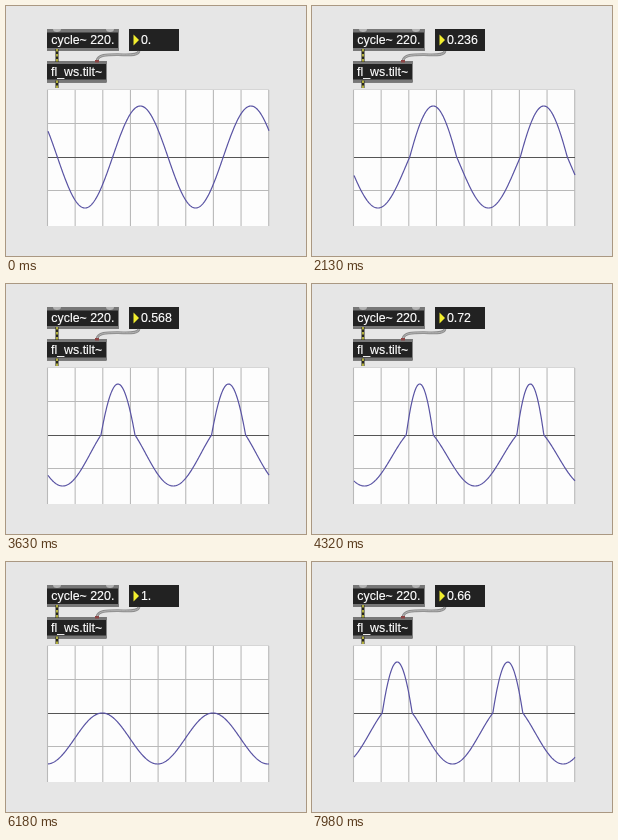
Write an HTML page that moves like this. It is 300 by 250 pixels and loops after 8000 ms.

```html
<!DOCTYPE html>
<html lang="en">
<head>
<meta charset="utf-8">
<title>Tilt waveshaper</title>
<style>
  html, body { margin: 0; width: 100%; height: 100%; overflow: hidden; background: #e6e6e6; }
  svg { display: block; width: 300px; height: 250px; }
  text { font: 12.4px "Liberation Sans", Arial, sans-serif; fill: #fff; stroke: #fff; stroke-width: .15; }
  .body { fill: #222; }
  .strip { fill: #777; }
  .inlet { fill: #b4b4b4; }
  .cord { fill: none; }
</style>
</head>
<body>
<svg viewBox="0 0 300 250">
  <!-- scope -->
  <rect x="41" y="83" width="222" height="137" fill="#fdfdfd"/>
  <path d="M41 83.5H263" stroke="#d6d6d6"/>
  <path id="grid" stroke="#b9b9b9" stroke-width="1.1" fill="none"/>
  <path d="M42 151.5H263" stroke="#555"/>
  <path id="wave" fill="none" stroke="#5953a3" stroke-width="1.2" stroke-linejoin="round"/>

  <!-- oscillator -->
  <rect class="body" x="41" y="23" width="71.5" height="22"/>
  <path class="strip" d="M41 23h71.5v3.5h-71.5zM41 42h71.5v3h-71.5z"/>
  <path class="inlet" d="M47 23h8a4 3 0 0 1-8 0zM100 23h8a4 3 0 0 1-8 0z"/>
  <text x="45.3" y="38.3">cycle~ 220.</text>

  <!-- number box -->
  <rect class="body" x="123" y="23" width="50" height="22"/>
  <path d="M127.5 28.5L133 34L127.5 39.5Z" fill="#f2ee2e"/>
  <text id="value" x="134.9" y="38.3">0.</text>

  <!-- waveshaper -->
  <rect class="body" x="41" y="55" width="59.5" height="21.5"/>
  <path class="strip" d="M41 55h59.5v3h-59.5zM41 73.5h59.5v3h-59.5z"/>
  <text x="45" y="70.2">fl_ws.tilt~</text>

  <!-- patch cords -->
  <g class="cord">
    <path d="M133 45C132 50 122 48.7 112 48.7C101 48.7 92 48.5 91 55" stroke="#8c8c8c" stroke-width="2.8"/>
    <path d="M133 45C132 50 122 48.7 112 48.7C101 48.7 92 48.5 91 55" stroke="#b4b4b4"/>
    <path d="M51 43V56M51 74.5V82" stroke="#25251a" stroke-width="3"/>
    <path d="M51 43V56M51 74.5V82" stroke="#d4d044" stroke-width="1.6" stroke-dasharray="2.5 2.5"/>
  </g>
  <rect x="89" y="54" width="4" height="2.5" fill="#8c4444"/>
</svg>
<script>
const LOOP = 8000, STEP = 30;
const LEFT = 42, RIGHT = 263, TOP = 84, BOTTOM = 220, MID = 151, AMP = 51;
const CELL = 27.65, PERIOD = 4 * CELL;
const FIRST_PEAK = 134.3, DRIFT = 0.00615;

// [time in ms, tilt]: a ramp up, a hold, a ramp down
const ramp = [[0, 0], [1068, 0], [1380, .068], [2910, .412], [4320, .72],
              [5430, .968], [5574, 1], [6444, 1], [6930, .892], [7980, .66]];

const wave = document.getElementById('wave');
const value = document.getElementById('value');

function gridPath() {
  let d = `M${LEFT} 117.5H${RIGHT}M${LEFT} 184.5H${RIGHT}`;
  for (let i = 0; i <= 8; i++) d += `M${41.5 + i * CELL} ${TOP}V${BOTTOM}`;
  return d;
}

function tiltAt(t) {
  const i = Math.max(1, ramp.findIndex(([time]) => time >= t));
  const [t0, a] = ramp[i - 1], [t1, b] = ramp[i];
  const tilt = a + (b - a) * (t - t0) / (t1 - t0);
  return Math.round(tilt * 250) / 250;
}

// Moves the zero level to the tilt, then rescales each half to full height
function shape(c, tilt) {
  return (c - tilt) / (c > tilt ? 1 - tilt : 1 + tilt);
}

function wavePath(t, tilt) {
  const peak = FIRST_PEAK - DRIFT * t;
  const points = [];
  for (let x = LEFT; x <= RIGHT; x += 0.5) {
    const c = Math.cos((x - peak) / PERIOD * 2 * Math.PI);
    points.push(x + ' ' + (MID - AMP * shape(c, tilt)).toFixed(2));
  }
  return 'M' + points.join('L');
}

function label(tilt) {
  const text = String(Number(tilt.toFixed(3)));
  return text.includes('.') ? text : text + '.';
}

function draw(now) {
  const t = Math.floor((now % LOOP) / STEP) * STEP;
  const tilt = tiltAt(t);
  wave.setAttribute('d', wavePath(t, tilt));
  value.textContent = label(tilt);
}

document.getElementById('grid').setAttribute('d', gridPath());
const start = performance.now();
function tick() {
  draw(performance.now() - start);
  requestAnimationFrame(tick);
}
tick();
</script>
</body>
</html>
```
